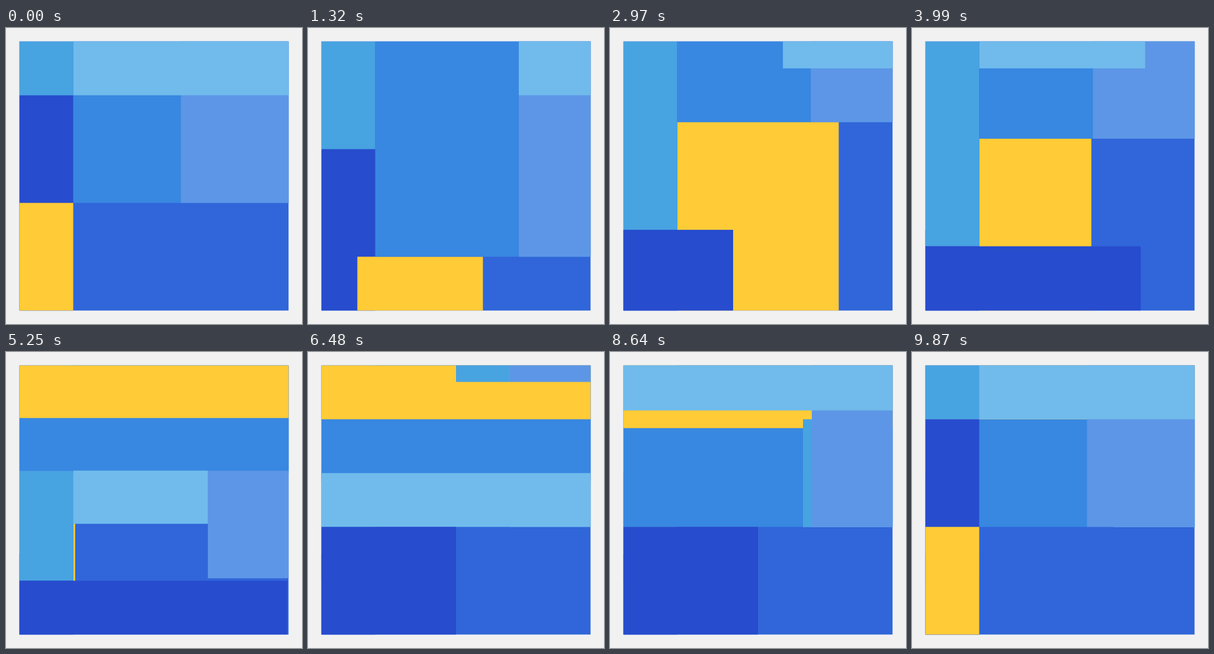
Animation, 500 px wide and 500 px high, one loop 9900 ms. Source, as an HTML page with a canvas:

```html
<!DOCTYPE html>
<html lang="en">
<head>
<meta charset="utf-8">
<title>Sliding blocks</title>
<style>
  html, body { margin: 0; height: 100%; overflow: hidden; background: #f1f1f1; }
  canvas { display: block; }
</style>
</head>
<body>
<canvas id="stage" width="500" height="500"></canvas>
<script>
const ctx = document.getElementById('stage').getContext('2d');
const UNIT = 500 / 11, MARGIN = UNIT / 2;
const PHASE = 900, PHASES = 11;

const sky = '#48a3e1', light = '#70bbec', dark = '#274ccd', medium = '#3887e1';
const peri = '#5d96e6', yellow = '#ffcb37', royal = '#3066d9';

// Bottom to top: colour, first [left, top, right, bottom] on a 10 x 10 grid,
// then the edges that slide in each phase.
const blocks = [
  [royal, [0, 0, 10, 10], {}],
  [dark, [0, 2, 2, 10], { 0: { top: 4 }, 2: { top: 7 } }],
  [yellow, [0, 6, 2, 10], {
    0: { top: 8, right: 6 }, 1: { left: 2 }, 2: { top: 3, right: 8 },
    4: { top: 4, right: 5 }, 5: { right: 2 } }],
  [sky, [0, 0, 2, 2], { 0: { bottom: 4 }, 2: { bottom: 7 }, 4: { bottom: 8 }, 5: { top: 4 } }],
  [medium, [2, 0, 10, 6], { 0: { bottom: 8 }, 2: { bottom: 3 }, 4: { bottom: 4 } }],
  [peri, [6, 0, 10, 6], {
    0: { bottom: 8 }, 1: { left: 8 }, 2: { bottom: 3 }, 3: { left: 5 },
    4: { left: 7, bottom: 4 }, 5: { top: 4, bottom: 8 }, 6: { bottom: 6 } }],
  [medium, [0, 0, 10, 0], { 5: { bottom: 4 }, 7: { bottom: 6 } }],
  [light, [2, 0, 10, 2], {
    0: { left: 6 }, 1: { left: 8 }, 2: { bottom: 1 }, 3: { left: 2 }, 4: { right: 7 },
    5: { top: 4, bottom: 6 }, 6: { left: 0, right: 10 }, 8: { left: 5 }, 9: { left: 7 } }],
  [yellow, [0, 0, 10, 0], { 5: { bottom: 2 }, 8: { bottom: 4 }, 9: { bottom: 2 } }],
  [dark, [0, 10, 2, 10], {
    2: { top: 7 }, 3: { right: 8 }, 4: { top: 8 }, 5: { right: 10 },
    6: { top: 6, right: 5 }, 10: { right: 2 } }],
  [sky, [5, 0, 7, 0], { 7: { bottom: 4 }, 8: { top: 2, bottom: 6 }, 9: { left: 7 } }],
  [peri, [7, 0, 10, 0], { 7: { bottom: 4 }, 8: { bottom: 6 }, 10: { left: 6 } }],
  [light, [0, 0, 10, 0], { 9: { bottom: 2 } }],
  [sky, [0, 0, 0, 2], { 10: { right: 2 } }],
  [dark, [0, 2, 0, 6], { 10: { right: 2 } }],
  [yellow, [0, 6, 0, 10], { 10: { right: 2 } }],
];

// cubic-bezier(1/3, 0, 1/3, 1)
function ease(x) {
  let lo = 0, hi = 1;
  for (let i = 0; i < 30; i++) {
    const s = (lo + hi) / 2;
    if (s - s * s + s * s * s < x) lo = s; else hi = s;
  }
  return lo * lo * (3 - 2 * lo);
}

function edgesAt([, [left, top, right, bottom], moves], phase, progress) {
  const edges = { left, top, right, bottom };
  for (let i = 0; i <= phase; i++) {
    const share = i < phase ? 1 : progress;
    for (const name in moves[i]) edges[name] += (moves[i][name] - edges[name]) * share;
  }
  return edges;
}

function draw(now) {
  const time = now / PHASE % PHASES;
  const phase = Math.floor(time);
  const progress = ease(time - phase);
  ctx.fillStyle = '#f1f1f1';
  ctx.fillRect(0, 0, 500, 500);
  for (const block of blocks) {
    const { left, top, right, bottom } = edgesAt(block, phase, progress);
    ctx.fillStyle = block[0];
    ctx.fillRect(MARGIN + left * UNIT, MARGIN + top * UNIT, (right - left) * UNIT, (bottom - top) * UNIT);
  }
  requestAnimationFrame(draw);
}
requestAnimationFrame(draw);
</script>
</body>
</html>
```
